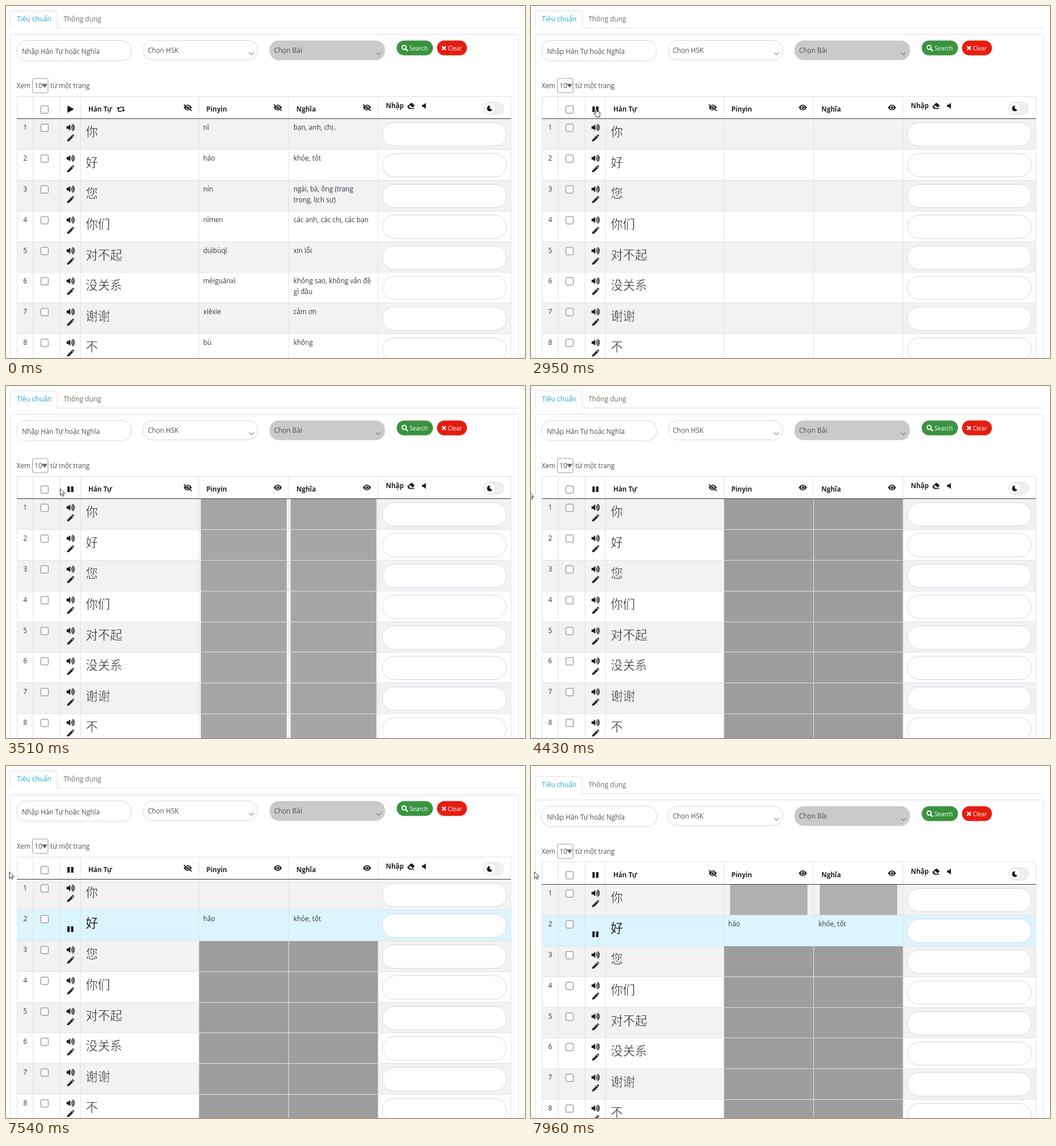
Write an HTML page that moves like this. It is 908 px wide and 617 px high and loops after 7.99 s.

```html
<!DOCTYPE html>
<html lang="vi">
<head>
<meta charset="utf-8">
<title>Bảng từ vựng</title>
<style>
html, body { margin: 0; width: 100%; height: 100%; overflow: hidden; background: #fff; }
svg { display: block; width: 908px; height: 617px; }
text { font: 11.7px "Open Sans", "Noto Sans", sans-serif; fill: #32373c; }
.form text { fill: #495057; }
.tab { font-size: 11.85px; }
.form .btn { font-size: 10.2px; fill: #fff; }
.head { font-weight: 700; font-size: 11.6px; fill: #212529; }
.num { text-anchor: middle; }
.han { font: 300 21.3px "Noto Sans CJK SC", "Noto Sans CJK", sans-serif; fill: #212529; }
.thin { stroke-width: .55px; }
.box { fill: #fff; stroke: #777; rx: 2px; }
.pill { fill: #fff; stroke: #d3d8de; }
.line { fill: none; stroke: #dee2e6; }
.cover { fill: #9d9d9d; transform-box: fill-box; transform-origin: center; }
.ink { fill: #16191c; }
.pen { fill: none; stroke: #16191c; }
</style>
</head>
<body>
<svg viewBox="0 0 908 617" xmlns="http://www.w3.org/2000/svg">
  <defs>
    <g id="speaker">
      <path class="ink" d="M-7-2.2h2.8L-.6-5.6V5.6L-4.2 2.2H-7z"/>
      <path class="pen" stroke-width="1.3" stroke-linecap="round" d="M1.2-1.8a2.2 2.2 0 0 1 0 3.6M2.4-3.8a4.5 4.5 0 0 1 0 7.6M3.7-5.6a6.8 6.8 0 0 1 0 11.2"/>
    </g>
    <g id="pencil">
      <path class="ink" d="M-6 6l.7-3.6L1.8-4.7 4.7-1.8-2.4 5.3zM2.6-5.4l.9-.9q.6-.5 1.2 0L6.2-4.7q.6.6 0 1.2l-.8.9z"/>
      <path d="M-4.2 2.8L2-3.4" stroke="#fff" stroke-width=".6"/>
    </g>
    <path id="pause" class="ink" d="M-5.4-5h4.2V5h-4.2zM1.1-5h4.2V5H1.1z"/>
    <g id="eye">
      <path class="ink" d="M-7 0Q-4-4.9 0-4.9T7 0Q4 4.9 0 4.9T-7 0z"/>
      <circle r="3.4" fill="#fff"/><circle class="ink" r="2.4"/>
      <circle cx="-.9" cy="-.9" r=".9" fill="#fff"/>
    </g>
    <g id="eyeOff">
      <use href="#eye"/>
      <path d="M-6.6-6.4L6.2 4.6" stroke="#fff" stroke-width="1.5"/>
      <path class="pen" stroke-width="1.5" stroke-linecap="round" d="M-6.4-5.2L6.4 5.4"/>
    </g>
    <path id="chevron" fill="none" stroke="#444" d="M-4-2L0 2 4-2"/>
  </defs>

  <g id="tabs">
    <path class="line" d="M7.500 38.500V11.500q0-3 3-3H86.500q3 0 3 3V38.500H896.500"/>
    <text class="tab" x="19" y="27" style="fill:#23a9cc">Tiêu chuẩn</text>
    <text class="tab" x="100.500" y="27" style="fill:#6b6f68">Thông dụng</text>
  </g>

  <g id="page">
    <g class="form">
      <rect class="line" x="7.500" y="49.500" width="889" height="620" rx="3"/>
      <rect class="pill" x="18.500" y="60.500" width="201" height="35.500" rx="16"/>
      <rect class="pill" x="240" y="60.500" width="200.500" height="34" rx="16"/>
      <rect x="461" y="60.500" width="202" height="34.500" rx="16" fill="#cacaca"/>
      <text x="28" y="84">Nhập Hán Tự hoặc Nghĩa</text>
      <text x="248" y="82">Chọn HSK</text>
      <text x="469" y="82">Chọn Bài</text>
      <use href="#chevron" x="429.500" y="83.500"/>
      <use href="#chevron" x="651.500" y="83.500"/>
      <rect x="683.500" y="60.500" width="63.500" height="26" rx="13" fill="#3a9340"/>
      <rect x="754" y="60.500" width="52.500" height="26" rx="13" fill="#e51d11"/>
      <g fill="none" stroke="#fff" stroke-width="1.900">
        <circle cx="696.500" cy="72.500" r="3.500"/>
        <path d="M699 75l4 4M763 70.500l6.500 6.500M769.500 70.500l-6.500 6.500" stroke-width="2.300"/>
      </g>
      <text class="btn" x="706" y="77.500">Search</text>
      <text class="btn" x="773" y="77.500">Clear</text>
      <text x="18.500" y="144">Xem</text>
      <rect x="46.500" y="127" width="27" height="25" rx="2" fill="#fff" stroke="#999"/>
      <text x="50" y="144">10</text>
      <path d="M62.500 136.500h10l-5 7z" fill="#666"/>
      <text x="77.500" y="144">từ một trang</text>
    </g>

    <g id="rows"></g>

    <g id="grid" class="line"></g>
    <path d="M19 197.500H883.500" stroke="#343a40"/>

    <rect class="box" x="61" y="175" width="13" height="13"/>
    <path id="play" class="ink" d="M107.500 175.500q0-1 1-.5l9.500 5.300q.8.600 0 1.200l-9.500 5.300q-1 .4-1-.6z"/>
    <use id="stop" href="#pause" x="112.700" y="181"/>
    <text class="head" x="144" y="185">Hán Tự</text>
    <text class="head" x="350.500" y="185">Pinyin</text>
    <text class="head" x="508" y="185">Nghĩa</text>
    <text class="head" x="664.500" y="179">Nhập</text>
    <g id="swap">
      <path class="pen" stroke-width="1.500" d="M196.500 179v5.500h6.500M199 177.500h6.500v5.500"/>
      <path class="ink" d="M193.500 180l3-3.600 3 3.600zM202.500 182l3 3.600 3-3.600z"/>
    </g>
    <use href="#eyeOff" x="318" y="178"/>
    <g id="eyesOff"><use href="#eyeOff" x="475.500" y="178"/><use href="#eyeOff" x="631.500" y="178"/></g>
    <g id="eyesOn"><use href="#eye" x="475.500" y="178"/><use href="#eye" x="631.500" y="178"/></g>
    <path class="ink" d="M702.500 175.500l6-5.500q.8-.6 1.600 0l4.400 3.700q.8.700 0 1.400l-4.300 4.100h4.300v1.200h-9.300l-2.700-3.300q-.8-.8 0-1.600z"/>
    <path d="M704.500 176l3.500 3h1.500l1.500-1.500-4-3.500z" fill="#fff"/>
    <path class="ink" d="M728 173h2.800l3.800-3.400v10.800l-3.800-3.400H728z"/>
    <rect x="836" y="168.500" width="34.500" height="21.500" rx="10.750" fill="#efefef" stroke="#e3e3e3"/>
    <circle cx="846.500" cy="179.300" r="10.500" fill="#fff" stroke="#d5d8dc"/>
    <path class="ink" d="M847 174.500a5 5 0 1 0 4 7.200a4.600 4.600 0 0 1-4-7.200z"/>
  </g>

  <g transform="translate(113.500 179.500)">
    <circle id="ring" r="66.500" fill="none" stroke="#8a8a8a" stroke-width="2" vector-effect="non-scaling-stroke"/>
  </g>
  <g id="cursor" fill="#fff" stroke="#111" stroke-width=".9" stroke-linejoin="round">
    <path id="arrow" d="M.5.500V12L3.200 9.600 5 13.600l1.700-.8L5 8.900h3.600z"/>
    <path id="hand" d="M-1 1q0-1.200 1.100-1.200T1.200 1v4.200q1.400-.7 2 .3q1.400-.6 2 .5q1.600-.3 1.600 1.200v3.300q0 1.500-1 2.700v1.600h-6v-1.500L-3.300 9.400q-1-1.500.2-1.900q.8-.2 2.100 1.200z"/>
  </g>
</svg>

<script>
const LOOP = 7990, CLICK = 2740, COVER = 2950, FIRST = 5590, SECOND = 7540;
const $ = id => document.getElementById(id);
const off = ms => ms / LOOP;
const loop = (el, frames) => el.animate(frames, { duration: LOOP, iterations: Infinity });

// Starts shown or hidden and switches at each time.
const flip = (el, shown, ...times) => loop(el, [0, ...times].map((t, i) => ({
  offset: off(t), opacity: +(shown === (i % 2 === 0)), easing: 'step-end'
})));

const words = [
  ['你', 'nĭ', 'bạn, anh, chị..'],
  ['好', 'hăo', 'khỏe, tốt'],
  ['您', 'nín', 'ngài, bà, ông (trang', 'trọng, lịch sự)'],
  ['你们', 'nĭmen', 'các anh, các chị, các bạn'],
  ['对不起', 'duìbùqĭ', 'xin lỗi'],
  ['没关系', 'méiguānxì', 'không sao, không vấn đề', 'gì đâu'],
  ['谢谢', 'xièxie', 'cảm ơn'],
  ['不', 'bù', 'không']
];
const rowY = i => Math.floor(197.6 + 53.86 * i);
const text = (x, y, s, cls = '') => `<text x="${x}" y="${y}" class="${cls}">${s}</text>`;

$('rows').innerHTML = words.map(([han, pinyin, ...mean], i) => {
  const h = rowY(i + 1) - rowY(i);
  const stripe = i % 2 ? '#fff' : '#f1f2f4';
  const fill = color => `<rect x="19" y="0" width="864" height="${h}" fill="${color}"/>`;
  return `<g transform="translate(0 ${rowY(i)})">
    ${fill(stripe)}
    ${i < 2 ? `<g class="active">${fill('#dbf5fc')}<use href="#pause" x="112.700" y="34"/>
      ${text(139.5, 31, han, 'han')}</g>` : ''}
    ${text(33.5, 20, i + 1, 'num')}
    <rect class="box" x="61" y="10" width="13" height="13"/>
    <g class="idle">
      <use href="#speaker" x="113" y="16"/><use href="#pencil" x="112.800" y="34.500"/>
      <g stroke="${stripe}">${text(139.5, 31, han, 'han thin')}</g>
    </g>
    <g class="words">${text(345, 20, pinyin)}${mean.map((m, k) => text(503, 20 + 18.5 * k, m)).join('')}</g>
    <g class="covers">
      <rect class="cover" x="338" y="1" width="156" height="${h - 1}"/>
      <rect class="cover" x="495" y="1" width="156" height="${h - 1}"/>
    </g>
    <rect class="pill" x="658.500" y="7.500" width="217" height="41" rx="20.500"/>
  </g>`;
}).join('');

$('grid').innerHTML = `<path d="M19 158.500H883.500${[19.5, 47.5, 94.5, 130.5, 337.5, 494.5, 651, 883.5]
  .map(x => `M${x} 158V640`).join('')}${words.map((_, i) => `M19 ${rowY(i + 1) + .5}H883`).join('')}"/>`;

// Row states
const closed = { transform: 'scaleX(0)', opacity: 0 }, open = { transform: 'scaleX(1)', opacity: 1 };
[...$('rows').children].forEach((row, i) => {
  const part = cls => row.querySelector('.' + cls);
  const turns = [[FIRST, SECOND], [SECOND]][i] || [];
  flip(part('words'), true, CLICK, ...turns);
  if (turns.length) {
    flip(part('active'), false, ...turns);
    flip(part('idle'), true, ...turns);
    flip(part('covers'), true, ...turns);
  }
  const frames = [
    { offset: 0, ...closed },
    { offset: off(COVER), ...closed, easing: 'ease' },
    { offset: off(COVER + 740), transform: open.transform },
    { offset: off(COVER + 900), opacity: 1 }
  ];
  // The first row closes again after its turn; the loop cuts this short.
  frames.push(...(i ? [{ offset: 1, ...open }] : [
    { offset: off(SECOND), ...open },
    { offset: off(SECOND), ...closed, easing: 'cubic-bezier(.32,.088,.388,.732)' },
    { offset: 1, transform: 'scaleX(.896)', opacity: .8 }
  ]));
  row.querySelectorAll('.cover').forEach(c => loop(c, frames));
});

// Header icons
for (const id of ['play', 'swap', 'eyesOff']) flip($(id), true, CLICK);
for (const id of ['stop', 'eyesOn']) flip($(id), false, CLICK);

// Everything slides down; the tabs start one pixel behind.
const shift = y => `translateY(${y}px)`;
const slide = (el, from) => loop(el, [
  { offset: 0, transform: shift(0), easing: 'step-end' },
  { offset: off(SECOND), transform: shift(from), easing: `steps(${10 - from})` },
  { offset: off(7960), transform: shift(10) },
  { offset: 1, transform: shift(10) }
]);
slide($('tabs'), 0);
slide($('page'), 1);

// Pointer
loop($('ring'), [
  { offset: 0, opacity: 0, transform: 'scale(1)', easing: 'step-end' },
  { offset: off(2030), opacity: .6, transform: 'scale(1)', easing: 'steps(6)' },
  { offset: off(2330), opacity: .6, transform: 'scale(.1)' },
  { offset: off(2330), opacity: 0, transform: 'scale(.1)' },
  { offset: 1, opacity: 0, transform: 'scale(.1)' }
]);
flip($('arrow'), false, 260, 1440, 3050);
flip($('hand'), false, 1440, 3050);
loop($('cursor'), [
  [0, 812, 640, 'step-end'], [260, 812, 606, 'cubic-bezier(.3,.3,.3,1)'], [990, 171, 201],
  [1090, 171, 201, 'ease-in-out'], [1320, 121, 181], [1420, 121, 181], [1520, 112, 175],
  [1630, 114, 180], [2960, 114, 180], [3300, 101, 173], [3510, 94.5, 179.5], [3560, 92, 179],
  [3900, 42, 176], [4220, -14, 181, 'step-end'], [4410, 1, 185], [4480, -14, 185, 'step-end'],
  [4750, 2, 185], [4880, 5.5, 185], [LOOP, 5.5, 185]
].map(([t, x, y, easing = 'linear']) => ({
  offset: off(t), transform: `translate(${x}px,${y}px)`, easing
})));
</script>
</body>
</html>
```
